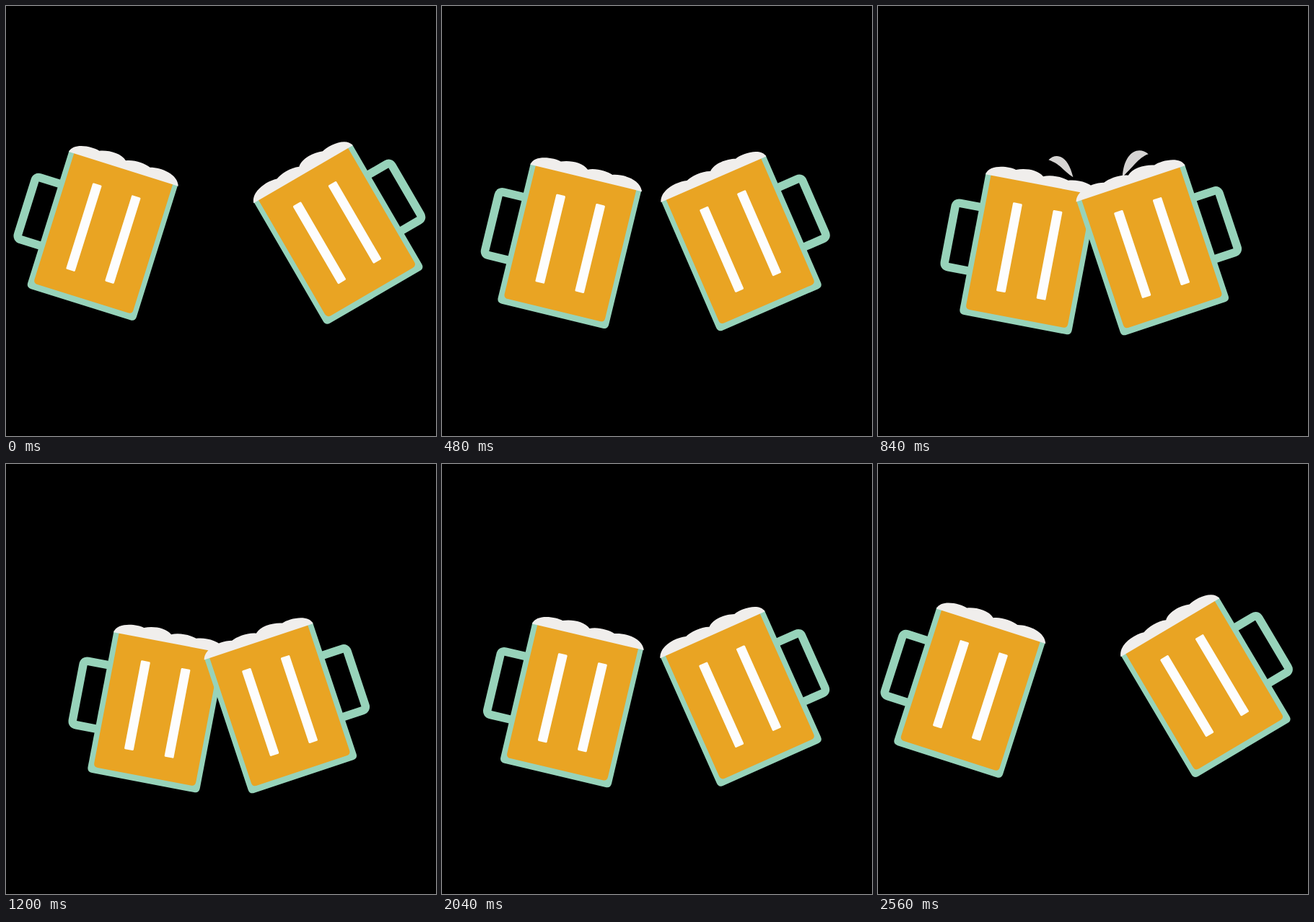
Write an HTML page that moves like this. It is 596 px wide and 596 px high and loops after 3280 ms.

```html
<!DOCTYPE html>
<html lang="en">
<head>
<meta charset="utf-8">
<title>Cheers</title>
<style>
  html, body { margin: 0; width: 100%; height: 100%; overflow: hidden; background: #000; }
  svg { display: block; width: 100vw; height: 100vh; }
</style>
</head>
<body>
<svg viewBox="0 0 596 596">
  <defs>
    <g id="mug">
      <path d="M4 48H-27Q-33 48-33 54V132Q-33 138-27 138H4" fill="none" stroke="#97d3ba" stroke-width="11.5"/>
      <path d="M0 0H158V192Q158 199 151 199H7Q0 199 0 192Z" fill="#97d3ba"/>
      <path d="M7.5 0H151V184.5Q151 190.5 145 190.5H13.5Q7.5 190.5 7.5 184.5Z" fill="#e9a423"/>
      <g fill="#fdfdfd">
        <rect x="44.7" y="33" width="13" height="125" rx="1.5"/>
        <rect x="101.3" y="33" width="13" height="125" rx="1.5"/>
      </g>
      <path d="M0 2C2-13 30-15 40-12C52-17 70-18 79-10C90-15 106-14 114-11C130-16 154-13 159 2Z" fill="#f0eeec"/>
    </g>
  </defs>
  <g id="splash" fill="#f0eeec">
    <path id="dropL" d="M241 226C252 215 268 220 275 250C262 242 258 232 241 226Z"/>
    <path id="dropR" d="M338 250C340 215 360 206 374 218C362 222 356 232 338 250Z"/>
  </g>
  <use href="#mug" id="left"/>
  <use href="#mug" id="right"/>
</svg>
<script>
const LOOP = 3280, STEP = 40;
const $ = id => document.getElementById(id);
const clamp = v => Math.max(0, Math.min(1, v));
const progress = (t, from, to) => clamp((t - from) / (to - from));
const mix = (a, b, p) => a.map((v, i) => v + (b[i] - v) * p);

// Poses: centre x, centre y, tilt in degrees
const mugs = [
  { el: $('left'), flip: 1, start: [133.6, 319.4, 17.4], meet: [208.9, 344.4, 10.8], end: [126.6, 318.1, 17.8], back: [1756, 2560] },
  { el: $('right'), flip: -1, start: [461.2, 318, -30.2], meet: [381, 339.3, -18.4], end: [454.9, 311, -30.7], back: [1680, 2465] }
];

function draw(t) {
  for (const { el, flip, start, meet, end, back } of mugs) {
    const [x, y, tilt] = t < 1400
      ? mix(start, meet, progress(t, 0, 840))
      : mix(meet, end, progress(t, ...back));
    el.setAttribute('transform',
      `translate(${x} ${y}) rotate(${tilt}) scale(${flip} 1) translate(-79.5 -100)`);
  }
  const rise = (t - 640) / 520;
  $('splash').setAttribute('opacity', clamp(1 - Math.abs(t - 875) / 325));
  $('dropL').setAttribute('transform', `translate(${-12 * rise} ${-33 * rise})`);
  $('dropR').setAttribute('transform', `translate(${2 * rise} ${-33 * rise})`);
}

const begin = performance.now();
function tick() {
  const t = (performance.now() - begin) % LOOP;
  draw(Math.floor(t / STEP) * STEP);
  requestAnimationFrame(tick);
}
tick();
</script>
</body>
</html>
```
